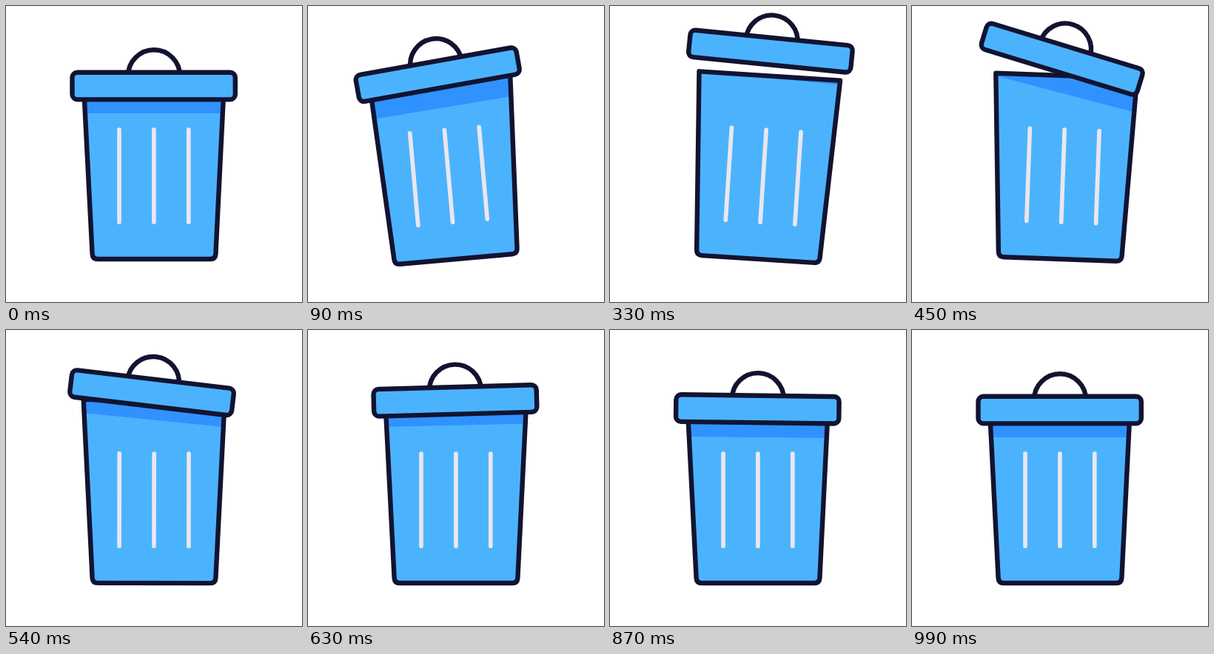
An HTML page that plays this animation: 400x400 px, repeating every 3020 ms.

```html
<!DOCTYPE html>
<html lang="en">
<head>
<meta charset="utf-8">
<title>Trash can</title>
<style>
  html, body { margin: 0; width: 100%; height: 100%; overflow: hidden; background: #fff; }
  svg { display: block; width: 100vw; height: 100vh; }
  .ink { stroke: #121331; stroke-width: 6.4; stroke-linejoin: round; }
  .blue { fill: #4bb3fd; }
</style>
</head>
<body>
<svg viewBox="0 0 400 400">
  <defs>
    <path id="can" d="M104.3 94 H295.3 L283.4 335 Q283 342 276 342 H124 Q117 342 116.6 335 Z"/>
    <clipPath id="inside"><use href="#can"/></clipPath>
  </defs>
  <g id="body">
    <use href="#can" class="blue"/>
    <g clip-path="url(#inside)">
      <rect id="shade" x="50" y="45" width="300" height="100" fill="#2f92ff"/>
    </g>
    <path d="M153 167 V292 M199.9 167 V292 M246.8 167 V292" stroke="#ebe6ef" stroke-width="5.7" stroke-linecap="round"/>
    <use href="#can" class="ink" fill="none"/>
    <g id="lid">
      <path class="ink" fill="none" d="M165 94.3 A35 35 0 0 1 235 94.3"/>
      <rect class="ink blue" x="89.5" y="89.8" width="220.3" height="36.6" rx="7"/>
    </g>
  </g>
</svg>
<script>
  const LOOP = 3020, STEP = 30, END = 990, PEAK = 330;

  const ease = p => (1 - Math.cos(Math.PI * p)) / 2;

  // Eased swing from rest through turning points [time, value]
  function swing(t, ...stops) {
    let [t0, v0] = [0, 0];
    for (const [t1, v1] of stops) {
      if (t < t1) return v0 + (v1 - v0) * ease((t - t0) / (t1 - t0));
      [t0, v0] = [t1, v1];
    }
    return v0;
  }

  // The lid is thrown up quickly, then settles with a long tail
  function lift(t) {
    if (t >= END) return 0;
    const rise = ease((t / PEAK) ** 0.7);
    const fall = Math.exp(-5.25 * ((t - PEAK) / (END - PEAK)) ** 1.75);
    return 47.5 * (t < PEAK ? rise : fall);
  }

  const [body, lid, shade] = ["body", "lid", "shade"].map(id => document.getElementById(id));

  function place(el, x, y, turn, cx, cy) {
    el.setAttribute("transform", `translate(${x} ${y}) rotate(${turn} ${cx} ${cy})`);
  }

  function draw(time) {
    const t = Math.min(END, Math.floor(time % LOOP / STEP) * STEP);
    const lean = swing(t, [180, -10.2], [345, 4], [560, 0]);
    const tilt = swing(t, [210, -13], [440, 15], [640, -1.7], [750, 1.9], [960, 0]);
    const shadeY = swing(t, [PEAK, -48], [450, -26], [880, 0]);
    place(body, 0, 0, lean, 200, 341);
    place(lid, -0.45 * Math.abs(tilt), -lift(t), tilt, 199.7, 108);
    place(shade, 0, shadeY, 0.85 * tilt, 200, 145);
  }

  const start = performance.now();
  function tick() {
    draw(performance.now() - start);
    requestAnimationFrame(tick);
  }
  tick();
</script>
</body>
</html>
```
